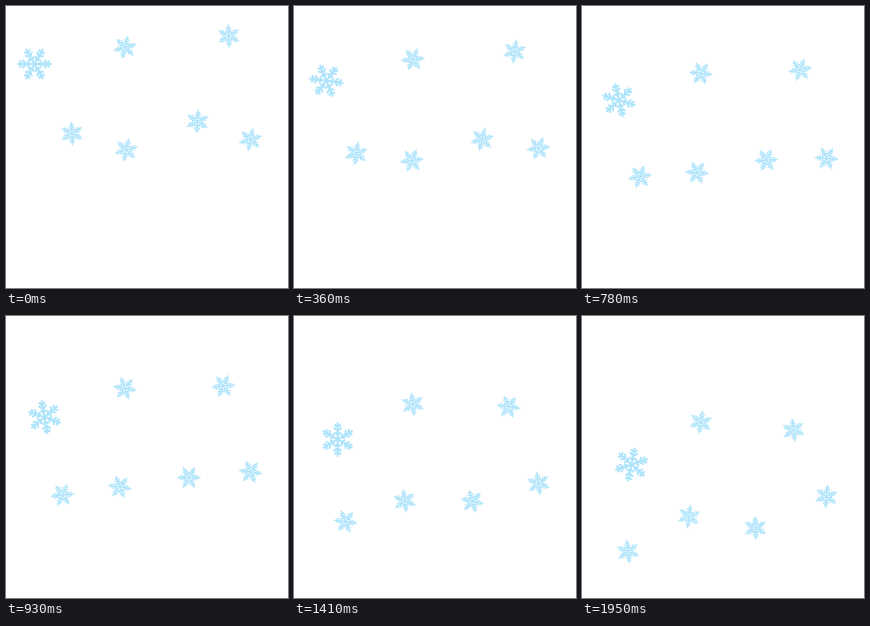
An HTML page with a canvas that plays this animation: 282x282 px, repeating every 1.98 s.

```html
<!DOCTYPE html>
<html lang="en">
<head>
<meta charset="utf-8">
<title>Snowflakes</title>
<style>
html, body { margin: 0; width: 100%; height: 100%; overflow: hidden; background: #fff; }
canvas { display: block; width: 282px; height: 282px; }
</style>
</head>
<body>
<canvas id="stage"></canvas>
<script>
const SIZE = 282, LOOP = 1980, STEP = 30, LAST = 1950;
const canvas = document.getElementById('stage');
const ctx = canvas.getContext('2d');
const ratio = window.devicePixelRatio || 1;
canvas.width = canvas.height = SIZE * ratio;

// Arm length, line width, and twigs as [distance along arm, length]
const large = { arm: 17.2, line: 2, twigs: [[4.5, 4], [8.5, 5.2], [12.3, 4.3]] };
const small = { arm: 11.7, line: 1.25, twigs: [[2.8, 3.4], [5.2, 3.6], [7.8, 2.4]] };

// Start and end centres, start angle and turn rate in degrees per second
const flakes = [
  { kind: large, from: [28.5, 58], to: [49.5, 148.5], angle: 0, spin: 21.3 },
  { kind: small, from: [119, 41.3], to: [118.8, 106.3], angle: -16, spin: 28 },
  { kind: small, from: [222.7, 30], to: [211.5, 114], angle: 28, spin: 28 },
  { kind: small, from: [66, 127.5], to: [46, 235.5], angle: 28, spin: 28 },
  { kind: small, from: [120.3, 144], to: [107, 200.5], angle: -17, spin: 28 },
  { kind: small, from: [191.5, 115.5], to: [173.5, 212], angle: -26, spin: 28 },
  { kind: small, from: [244.5, 133.5], to: [244.5, 180.5], angle: -18, spin: 28 }
];

function flakePath({ arm, twigs }) {
  const path = new Path2D();
  for (let i = 0; i < 6; i++) {
    const a = i * Math.PI / 3;
    const at = r => [r * Math.cos(a), r * Math.sin(a)];
    path.moveTo(0, 0);
    path.lineTo(...at(arm));
    for (const [r, len] of twigs) {
      const [x, y] = at(r);
      for (const side of [-1, 1]) {
        const b = a + side * Math.PI / 3.6;
        path.moveTo(x, y);
        path.lineTo(x + len * Math.cos(b), y + len * Math.sin(b));
      }
    }
  }
  return path;
}

for (const kind of [large, small]) kind.path = flakePath(kind);

function draw(time) {
  const t = Math.floor((time % LOOP) / STEP) * STEP;
  const p = t / LAST;
  ctx.setTransform(ratio, 0, 0, ratio, 0, 0);
  ctx.fillStyle = '#fff';
  ctx.fillRect(0, 0, SIZE, SIZE);
  ctx.strokeStyle = '#aee4fb';
  for (const { kind, from, to, angle, spin } of flakes) {
    ctx.save();
    ctx.translate(from[0] + (to[0] - from[0]) * p, from[1] + (to[1] - from[1]) * p);
    ctx.rotate((angle + spin * t / 1000) * Math.PI / 180);
    ctx.lineWidth = kind.line;
    ctx.stroke(kind.path);
    ctx.restore();
  }
}

const start = performance.now();
function tick() {
  draw(performance.now() - start);
  requestAnimationFrame(tick);
}
tick();
</script>
</body>
</html>
```
